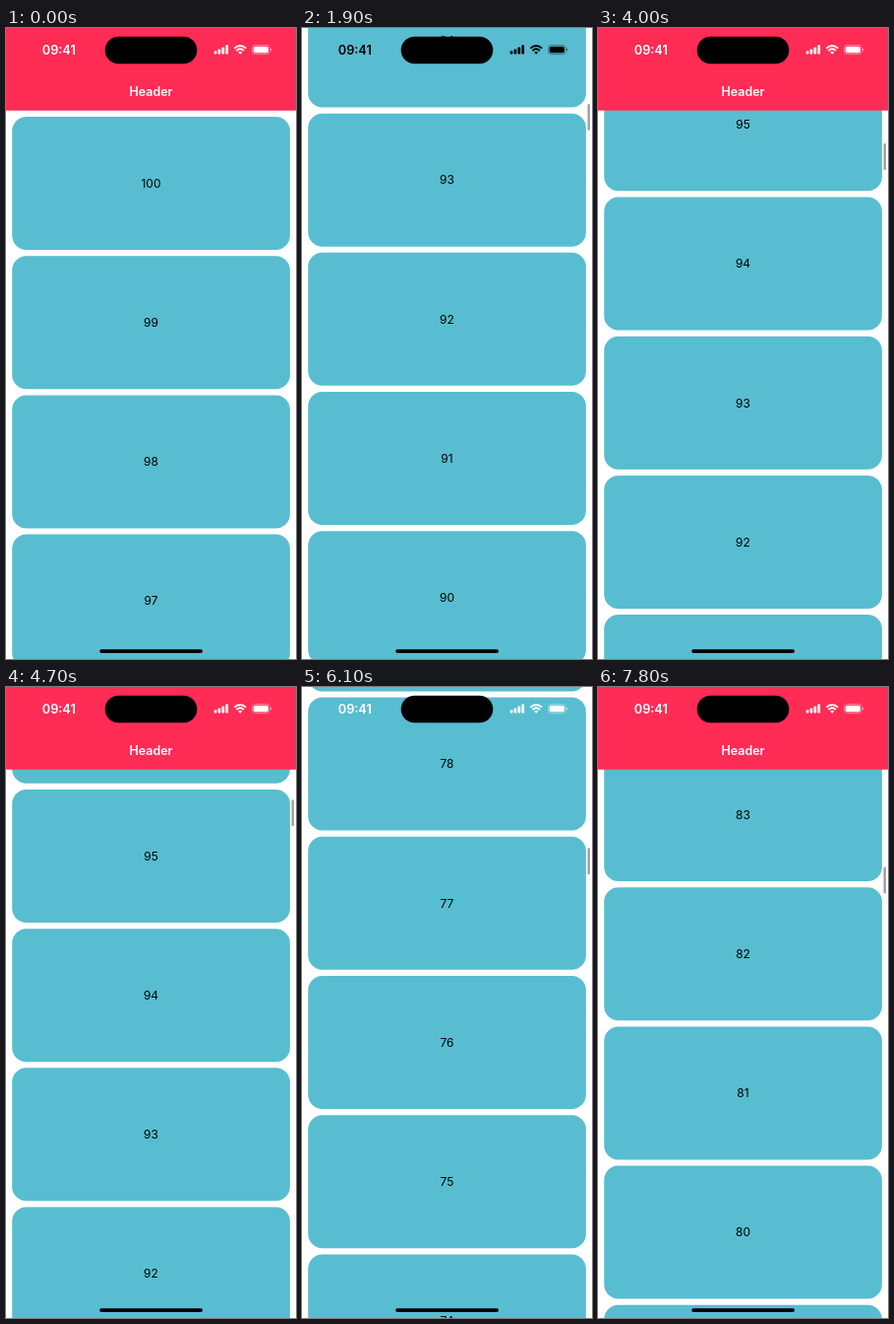
An HTML page that plays this animation: 295 px wide and 640 px high, repeating every 8 s.

```html
<!DOCTYPE html>
<html lang="en">
<head>
<meta charset="utf-8">
<title>Collapsing header</title>
<style>
  html, body { margin: 0; width: 100%; height: 100%; overflow: hidden; background: #fff; }
  svg { display: block; width: 100vw; height: 100vh; }
  text { font: 12px Inter, sans-serif; text-anchor: middle; }
  .bold { font-size: 12.75px; font-weight: 600; }
</style>
</head>
<body>
<svg viewBox="0 0 295 640">
  <g id="list"></g>
  <rect id="thumb" x="290.5" width="2.4" height="27" rx="1.2" fill="#000" fill-opacity=".38"/>
  <g id="header">
    <rect y="-10" width="295" height="93.7" fill="#ff2c55"/>
    <text class="bold" x="147.5" y="68.7" fill="#fff" style="font-size:12.5px">Header</text>
  </g>
  <rect x="100.7" y="8.7" width="93.6" height="27.6" rx="13.8"/>
  <g id="status">
    <text class="bold" x="53.8" y="26.6">09:41</text>
    <rect x="211.7" y="23.2" width="2.7" height="3.4" rx=".8"/>
    <rect x="215.6" y="21.5" width="2.7" height="5.1" rx=".8"/>
    <rect x="219.5" y="19.4" width="2.7" height="7.2" rx=".8"/>
    <rect x="223.4" y="17.2" width="2.7" height="9.4" rx=".8"/>
    <g fill="none" stroke="currentColor" stroke-width="1.8">
      <path d="M232.3 20.6Q238.2 15.4 244.1 20.6"/>
      <path d="M234.4 23Q238.2 19.6 242 23"/>
    </g>
    <path d="M236.2 24.6Q238.2 23 240.2 24.6L238.2 26.7Z"/>
    <rect x="250.4" y="17.4" width="17.8" height="9.2" rx="3" fill="none" stroke="currentColor" stroke-width=".8" opacity=".45"/>
    <rect x="251.7" y="18.7" width="15.2" height="6.6" rx="1.9"/>
    <path d="M269 20.4q1.3 .4 1.3 1.6t-1.3 1.6z" opacity=".5"/>
  </g>
  <rect x="95.2" y="630.2" width="104.8" height="3.8" rx="1.9"/>
</svg>
<script>
const LOOP = 8000, STEP = 100, PITCH = 141.2, CARD_TOP = 90, BAR = 84, DECAY = 500;
const el = id => document.getElementById(id);
const clamp = (v, lo, hi) => Math.min(hi, Math.max(lo, v));

// Each swipe accelerates under the finger, then glides with exponential decay.
const swipes = [
  { start: 720, release: 1300, drag: 309, glide: 977 },
  { start: 2950, release: 3250, drag: -144, glide: -438 },
  { start: 4850, release: 5100, drag: 497.6, glide: 2315.8, caught: 6500 },
  { start: 6890, release: 7150, drag: -252, glide: -932 }
];

function travel(s, t) {
  t = Math.min(t, s.caught || t);
  if (t < s.release) return s.drag * Math.max(0, (t - s.start) / (s.release - s.start)) ** 2;
  return s.drag + s.glide * (1 - Math.exp((s.release - t) / DECAY));
}

function pose(t) {
  let scroll = 0, moved = 0, hidden = 0;
  swipes.forEach((s, i) => {
    if (t < s.start) return;
    const next = swipes[i + 1];
    moved = travel(s, next ? Math.min(t, next.start) : t);
    scroll += moved;
    hidden = clamp(hidden + moved, 0, BAR);
  });
  return { scroll, hidden };
}

const cards = Array.from({ length: 6 }, () => {
  const card = document.createElementNS("http://www.w3.org/2000/svg", "g");
  card.innerHTML = '<rect x="6.2" width="282.7" height="135" rx="14.5" fill="#58bdd0"/><text x="147.5" y="71.8"></text>';
  el("list").append(card);
  return card;
});

function draw(t) {
  const { scroll, hidden } = pose(t);
  const first = Math.max(0, Math.floor((scroll - CARD_TOP) / PITCH));
  cards.forEach((card, i) => {
    const index = first + i;
    card.setAttribute("transform", `translate(0 ${CARD_TOP + index * PITCH - scroll})`);
    card.lastChild.textContent = 100 - index;
  });
  el("header").setAttribute("transform", `translate(0 ${-hidden})`);
  el("header").style.display = hidden < BAR ? "" : "none";
  el("thumb").setAttribute("y", 38 + 49 * (1 - hidden / BAR) ** 0.8 + scroll * 0.0393);
  el("thumb").style.opacity = clamp((t - 700) / 200, 0, 1);
  const color = t >= 1400 && t < 3400 ? "#000" : "#fff";
  el("status").setAttribute("fill", color);
  el("status").style.color = color;
}

function tick() {
  const t = performance.now() % LOOP;
  draw(Math.min(Math.floor(t / STEP) * STEP, 7800));
  requestAnimationFrame(tick);
}
tick();
</script>
</body>
</html>
```
